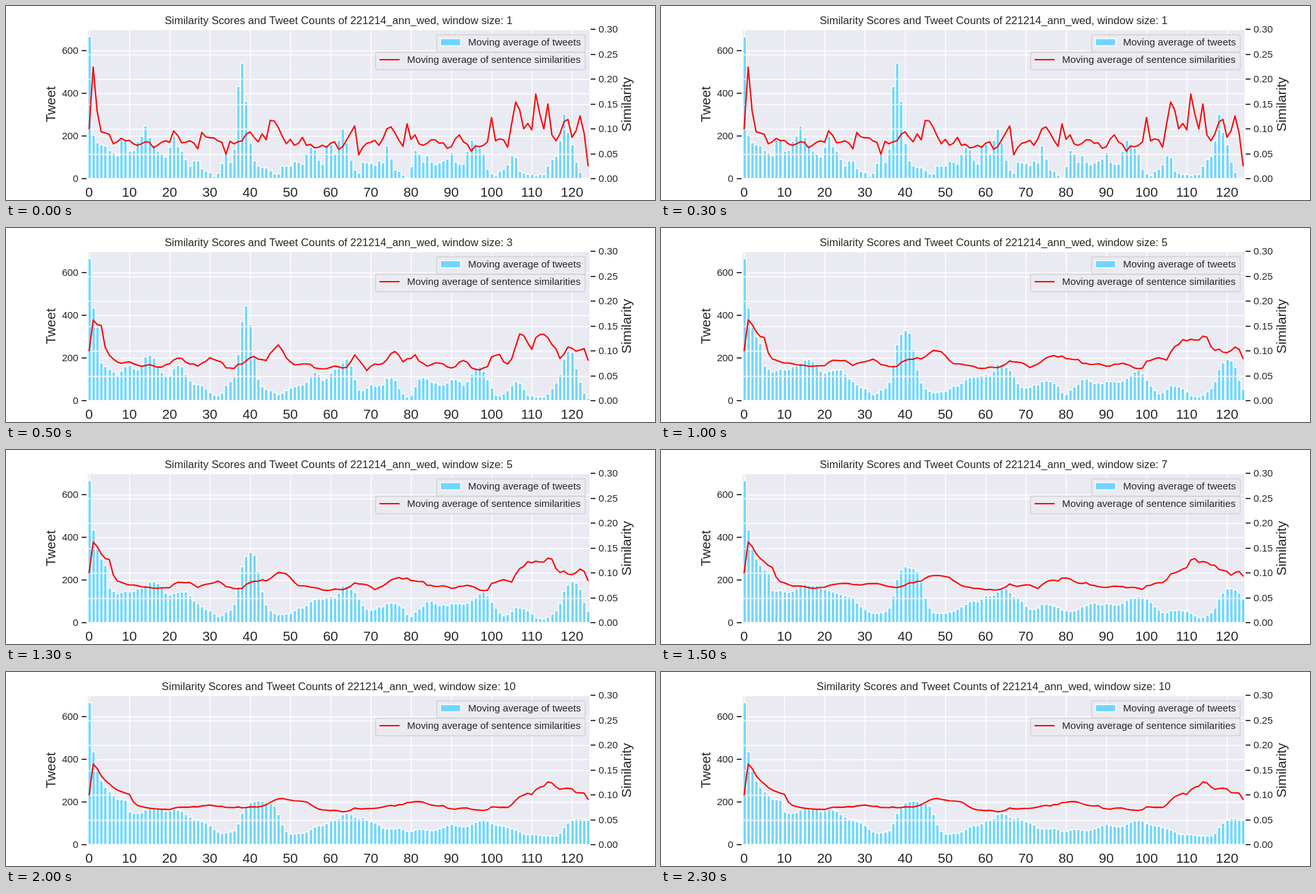
An HTML page with a canvas for the animation above (2500 ms loop, 1000 px wide and 300 px high).

```html
<!DOCTYPE html>
<html lang="en">
<head>
<meta charset="utf-8">
<title>Moving averages</title>
<style>
  html, body { margin: 0; width: 100%; height: 100%; overflow: hidden; background: #fff; }
  canvas { display: block; }
</style>
</head>
<body>
<canvas id="chart" width="1000" height="300"></canvas>
<script>
const ctx = document.getElementById('chart').getContext('2d');

const tweets = [
  668, 204, 170, 160, 155, 133, 125, 108, 185, 187, 130, 135, 175, 200, 248, 195, 160, 130, 115, 103,
  150, 200, 152, 130, 90, 62, 85, 85, 50, 37, 30, 13, 28, 72, 118, 80, 140, 433, 545, 365,
  167, 85, 60, 55, 52, 40, 25, 25, 62, 60, 60, 83, 78, 70, 117, 148, 136, 87, 70, 160,
  165, 118, 182, 237, 170, 88, 42, 28, 80, 75, 72, 65, 85, 75, 155, 95, 43, 35, 18, 5,
  58, 135, 118, 78, 110, 80, 68, 75, 85, 95, 125, 80, 70, 70, 130, 182, 155, 145, 115, 45,
  25, 15, 37, 45, 68, 108, 100, 35, 28, 22, 20, 15, 20, 20, 60, 90, 105, 178, 305, 218,
  160, 78, 30, 5, 1];

// thousandths
const similarity = [
  100, 224, 135, 94, 92, 89, 70, 74, 81, 76, 77, 70, 67, 70, 74, 73, 62, 67, 73, 76,
  73, 96, 87, 72, 73, 76, 72, 60, 93, 84, 82, 82, 76, 73, 49, 75, 70, 74, 76, 89,
  94, 83, 74, 90, 78, 117, 116, 103, 85, 70, 79, 67, 71, 83, 67, 69, 62, 63, 67, 63,
  71, 74, 59, 64, 78, 92, 106, 48, 63, 71, 73, 77, 67, 80, 100, 104, 92, 77, 65, 110,
  79, 88, 70, 67, 71, 78, 78, 71, 72, 61, 64, 80, 88, 74, 69, 55, 66, 64, 67, 74,
  123, 76, 80, 78, 63, 110, 154, 138, 100, 111, 98, 170, 130, 100, 150, 88, 76, 90, 114, 119,
  83, 96, 126, 92, 26];

const windows = [1, 3, 5, 7, 10], hold = 500;
const left = 125, right = 900, top_ = 36, bottom = 267;
const small = 15.28, medium = 16.67, large = 20.83;
const thin = 1.39, thick = 1.74;
const blue = '#70d6ff', panel = '#eaeaf2', ink = '#262626';

const xAt = i => 128.1 + 6.2 * i;
const tweetY = v => bottom - v * 231 / 701.4;
const simY = v => bottom - v * 0.77;
const snap = v => Math.floor(v + 0.5) + 0.5;

// trailing mean over at most n values
function average(data, n) {
  return data.map((_, i) => {
    const part = data.slice(Math.max(0, i - n + 1), i + 1);
    return part.reduce((a, b) => a + b) / part.length;
  });
}

function line(x1, y1, x2, y2, color, width) {
  ctx.strokeStyle = color;
  ctx.lineWidth = width;
  ctx.beginPath();
  ctx.moveTo(x1, y1);
  ctx.lineTo(x2, y2);
  ctx.stroke();
}

function text(s, x, y, size, align = 'left', angle = 0) {
  ctx.save();
  ctx.translate(x, y);
  ctx.rotate(angle);
  ctx.font = `${size}px "Liberation Sans", Arial, sans-serif`;
  ctx.textAlign = align;
  ctx.fillStyle = ink;
  ctx.fillText(s, 0, 0);
  ctx.restore();
}

function bar(x1, y1, x2, y2) {
  const x = snap(x1), y = snap(y1), w = snap(x2) - x, h = snap(y2) - y;
  ctx.fillStyle = blue;
  ctx.fillRect(x, y, w, h);
  ctx.strokeStyle = '#fff';
  ctx.lineWidth = thin;
  ctx.strokeRect(x, y, w, h);
}

function legendBox(x, y, label) {
  ctx.beginPath();
  ctx.roundRect(x, y, 892.5 - x, 27, 3);
  ctx.globalAlpha = 0.8;
  ctx.fillStyle = panel;
  ctx.fill();
  ctx.strokeStyle = '#ccc';
  ctx.lineWidth = thin;
  ctx.stroke();
  ctx.globalAlpha = 1;
  text(label, x + 48.5, y + 16.5, small);
}

function plot(n) {
  ctx.save();
  ctx.beginPath();
  ctx.rect(left, top_, right - left, bottom - top_);
  ctx.clip();
  ctx.fillStyle = panel;
  ctx.fillRect(left, top_, right - left, bottom - top_);

  for (let i = 0; i <= 120; i += 10) line(snap(xAt(i)), top_, snap(xAt(i)), bottom, '#fff', thin);
  for (let v = 0; v <= 600; v += 200) line(left, snap(tweetY(v)), right, snap(tweetY(v)), '#fff', thin);
  average(tweets, n).forEach((v, i) => bar(xAt(i) - 2.48, tweetY(v), xAt(i) + 2.48, bottom));

  legendBox(663.5, 44.5, 'Moving average of tweets');
  bar(669, 50, 699.6, 61);

  for (let v = 0; v <= 300; v += 50) line(left, snap(simY(v)), right, snap(simY(v)), '#fff', thin);
  ctx.strokeStyle = '#f00';
  ctx.lineWidth = 2.08;
  ctx.lineJoin = ctx.lineCap = 'round';
  ctx.beginPath();
  average(similarity, n).forEach((v, i) => ctx.lineTo(xAt(i), simY(v)));
  ctx.stroke();
  ctx.lineJoin = 'miter';
  ctx.lineCap = 'butt';

  legendBox(569.5, 71.5, 'Moving average of sentence similarities');
  line(575.5, 83, 606.5, 83, '#f00', 2.08);
  ctx.restore();
}

function axes() {
  for (let v = 0; v <= 600; v += 200) {
    const y = Math.round(tweetY(v));
    line(116.7, y, left, y, ink, thick);
    text(v, 111.6, y + 5, small, 'right');
  }
  for (let v = 0; v <= 300; v += 50) {
    const y = Math.round(simY(v));
    line(right, y, 908.3, y, ink, thick);
    text((v / 1000).toFixed(2), 913, y + 5, small);
  }
  for (let i = 0; i <= 120; i += 10) text(i, xAt(i), 295, large, 'center');
  ctx.strokeStyle = '#fff';
  ctx.lineWidth = thick;
  ctx.strokeRect(left, top_, right - left, bottom - top_);
  text('Tweet', 76, 152, large, 'center', -Math.PI / 2);
  text('Similarity', 963, 152, large, 'center', -Math.PI / 2);
}

function draw() {
  const n = windows[Math.floor(performance.now() / hold) % windows.length];
  ctx.fillStyle = '#fff';
  ctx.fillRect(0, 0, 1000, 300);
  plot(n);
  axes();
  text(`Similarity Scores and Tweet Counts of 221214_ann_wed, window size: ${n}`, 512.5, 28, medium, 'center');
  requestAnimationFrame(draw);
}
draw();
</script>
</body>
</html>
```
